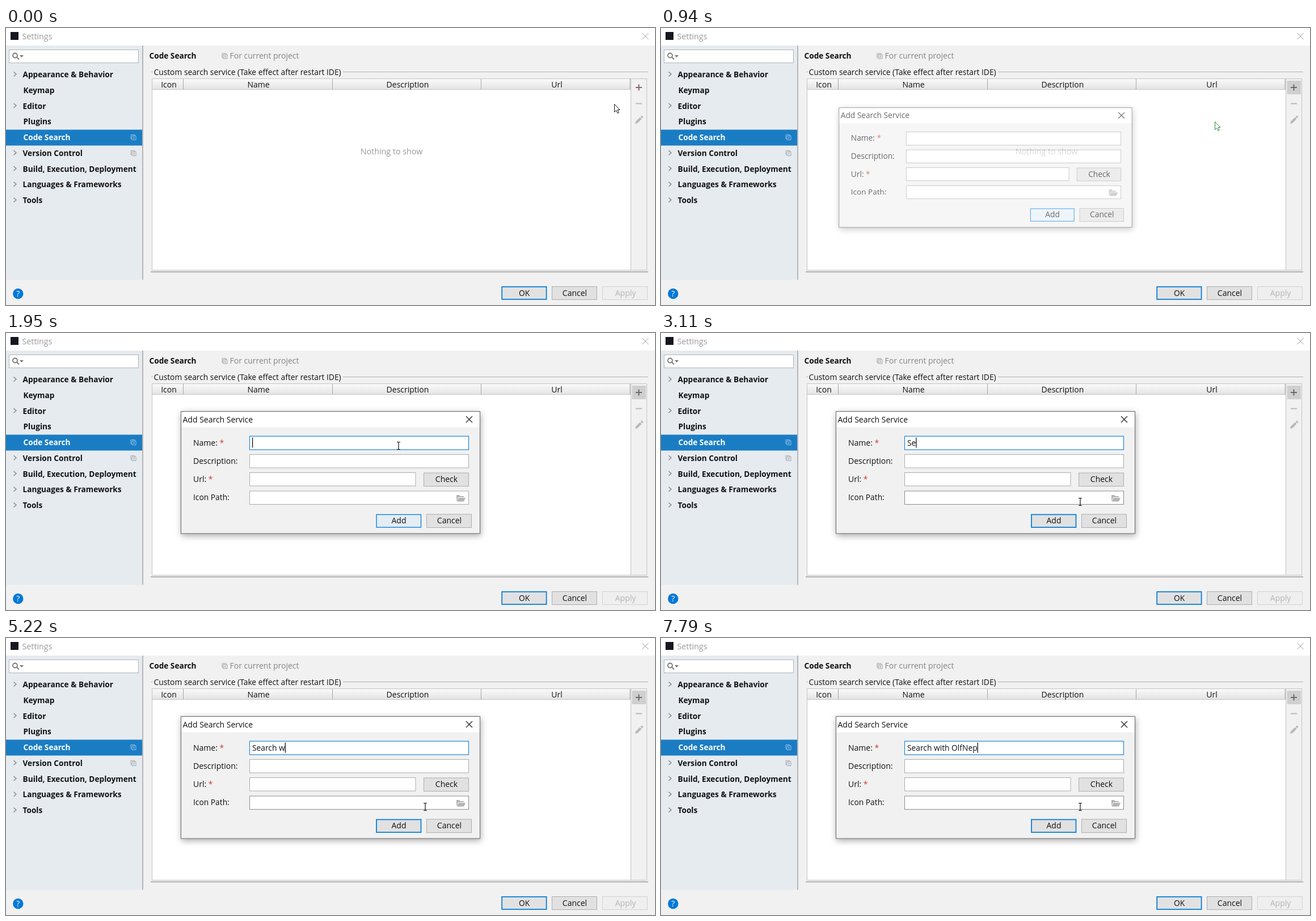
Animation of 1144 by 489 pixels, one loop 8 s. Source, as an HTML page:

```html
<!DOCTYPE html>
<html lang="en">
<head>
<meta charset="utf-8">
<title>Settings</title>
<style>
html, body { margin: 0; width: 100%; height: 100%; overflow: hidden; background: #f1f1f1; }
svg { display: block; width: 1144px; height: 489px; }
text { font: 14px "Open Sans", "Noto Sans", sans-serif; fill: #111; white-space: pre; }
.bold { font-size: 13.65px; font-weight: 700; }
.fit { font-size: 13.8px; }
.mid { text-anchor: middle; }
.dim { fill: #999; font-size: 14.3px; }
.line { fill: none; stroke: #888; stroke-width: 1.5; }
.field { fill: #fff; stroke: #ababab; }
.btn { fill: #e1e1e1; stroke: #adadad; }
.primary { fill: #e1e1e1; stroke: #0a7fd9; stroke-width: 1.8; }
.star { fill: #c8403a; }
</style>
</head>
<body>
<svg viewBox="0 0 1144 489">
  <defs>
    <linearGradient id="head" x2="0" y2="1">
      <stop offset="0" stop-color="#fafafa"/><stop offset="1" stop-color="#e4e4e4"/>
    </linearGradient>
    <filter id="blur" x="-10%" y="-10%" width="120%" height="125%"><feGaussianBlur stdDeviation="6"/></filter>
    <g id="copy" fill="none" stroke-width="1">
      <path d="M2.5 7.5H.5V.5H7.500V2.500"/>
      <path d="M2.5 2.5H9.5V9.5H2.5ZM4.500 5H7.500M4.500 7H7.500"/>
    </g>
  </defs>

  <!-- window -->
  <rect width="1144" height="489" fill="#f1f1f1"/>
  <rect width="1144" height="31" fill="#fff"/>
  <rect x="8" y="7" width="14" height="14" fill="#15161f"/>
  <text x="28.500" y="20" class="dim">Settings</text>
  <path d="M1121.500 9L1132.500 20M1132.500 9L1121.500 20" class="line" style="stroke:#999;stroke-width:1"/>

  <!-- sidebar -->
  <rect y="31" width="240" height="413.500" fill="#e6ebf0"/>
  <rect x="240" y="31" width="2" height="413.500" fill="#b4b6b8"/>
  <rect x="5.500" y="38.500" width="228" height="23" fill="#fff" stroke="#b2b5b8"/>
  <g class="line" style="stroke:#777;stroke-width:1.8">
    <circle cx="16" cy="48.500" r="4"/><path d="M19 51.500L23 55.500"/>
  </g>
  <path d="M24 48H31L27.500 52Z" fill="#777"/>
  <rect y="179.500" width="240" height="28" fill="#1a7dc4"/>
  <g id="tree"></g>
  <use href="#copy" x="219.500" y="188" stroke="#8fc0e6"/>
  <use href="#copy" x="219.500" y="216" stroke="#a4a8ac"/>
  <circle cx="21.300" cy="469" r="9.200" fill="#0078d7"/>
  <text x="21.300" y="474" class="mid" style="fill:#fff">?</text>

  <!-- page -->
  <text x="252.500" y="54" class="bold">Code Search</text>
  <use href="#copy" x="380.500" y="44.500" stroke="#a0a0a0"/>
  <text x="394.500" y="54" style="fill:#858585">For current project</text>
  <path d="M256 77.500H259M594 77.500H1132" stroke="#b0b0b0"/>
  <text x="260.500" y="83" class="fit">Custom search service (Take effect after restart IDE)</text>
  <path d="M255 430.500H1132" stroke="#9a9a9a" stroke-width="1.600"/>
  <rect x="257.500" y="89.500" width="872" height="338" fill="#f1f1f1" stroke="#c4c4c4"/>
  <rect x="258" y="90" width="843" height="337" fill="#fff"/>
  <rect x="258" y="90" width="843" height="18" fill="url(#head)"/>
  <path d="M258 108.500H1101M1101.500 90V427" stroke="#c4c4c4"/>
  <path d="M312.500 90V108M575.500 90V108M837.500 90V108M1100 90V108" stroke="#a6a6a6"/>
  <g class="fit">
    <text x="287" y="105" class="mid">Icon</text>
    <text x="445" y="105" class="mid">Name</text>
    <text x="708" y="105" class="mid">Description</text>
    <text x="971" y="105" class="mid">Url</text>
  </g>
  <text x="679.500" y="223" class="mid dim">Nothing to show</text>
  <rect id="hover" x="1103.500" y="93" width="24.500" height="24" fill="#cfcfcf"/>
  <path id="plus" d="M1110 105H1121M1115.500 99.500V110.500" stroke-width="2"/>
  <path d="M1110 133.500H1121" stroke="#b8b8b8" stroke-width="2"/>
  <path d="M1109 169L1110 165L1117.500 157.500L1120.500 160.500L1113 168ZM1118.500 156.500L1120 155Q1121 154.500 1122 155.500L1123 156.500Q1123.500 157.500 1122.500 158.500L1121.500 159.500Z" fill="#b8b8b8"/>
  <rect x="874.200" y="456.800" width="78.400" height="22.200" class="primary"/>
  <text x="913.500" y="472.500" class="mid fit">OK</text>
  <rect x="962.500" y="456.500" width="79" height="23" class="btn"/>
  <text x="1002.500" y="472.500" class="mid">Cancel</text>
  <rect x="1051.500" y="456.500" width="79" height="23" fill="#efefef" stroke="#d2d2d2"/>
  <text x="1092" y="472.500" class="mid" style="fill:#b4b4b4">Apply</text>

  <!-- dialog -->
  <g id="dialog">
    <rect x="309" y="141" width="528" height="217" fill="#000" opacity=".33" filter="url(#blur)"/>
    <rect x="308.500" y="138.500" width="527" height="215.500" fill="#f1f1f1"/>
    <rect x="308.500" y="138.500" width="527" height="28" fill="#fff"/>
    <rect x="308.500" y="138.500" width="527" height="215.500" fill="none" stroke="#666"/>
    <text x="311.500" y="157.500">Add Search Service</text>
    <path d="M811 147L822 158M822 147L811 158" stroke="#222" stroke-width="1.200"/>
    <text x="330" y="198.500">Name: <tspan class="star">*</tspan></text>
    <text x="330" y="231">Description:</text>
    <text x="330" y="263">Url: <tspan class="star">*</tspan></text>
    <text x="330" y="295" class="fit">Icon Path:</text>
    <rect id="name" x="429.500" y="182.200" width="386" height="23.800" class="field"/>
    <rect x="429.500" y="214.500" width="386" height="23.500" class="field"/>
    <rect x="429.500" y="246.500" width="292.500" height="23.500" class="field"/>
    <rect id="path" x="429.500" y="279" width="386" height="23.500" class="field"/>
    <path d="M794 297V286H799L801 288H807V290H797Z" fill="#b4b4b4"/>
    <path d="M797.500 291H810L807 297.500H794.500Z" fill="#b4b4b4"/>
    <rect x="736.500" y="247" width="79" height="23.500" class="btn"/>
    <text x="776.500" y="263" class="mid">Check</text>
    <rect id="add" x="653" y="320.500" width="78.500" height="22.500"/>
    <text x="692.500" y="336" class="mid">Add</text>
    <rect x="741.500" y="320" width="79" height="23.500" class="btn"/>
    <text x="781.500" y="336" class="mid">Cancel</text>
    <text id="typed" x="434" y="198.500" class="fit"></text>
    <rect id="caret" y="184.500" width="1.200" height="18" fill="#000"/>
  </g>

  <path id="arrow" d="M.5 .5V14.500L3.800 11.500L6 16.500L8.200 15.500L6 10.500H10Z" fill="#fff"/>
  <path id="beam" d="M-3 -6.500H-1Q0 -6.500 0 -5.500Q0 -6.500 1 -6.500H3M0 -5.500V5.500M-3 6.500H-1Q0 6.500 0 5.500Q0 6.500 1 6.500H3" fill="none" stroke="#111" stroke-width="1.200"/>
</svg>
<script>
const LOOP = 8000;
const $ = id => document.getElementById(id);
const show = (id, on) => $(id).setAttribute('visibility', on ? 'visible' : 'hidden');
const set = (id, attrs) => Object.entries(attrs).forEach(([k, v]) => $(id).setAttribute(k, v));

// A leading ">" marks a node that can be expanded.
const nodes = ['>Appearance & Behavior', 'Keymap', '>Editor', 'Plugins', 'Code Search',
  '>Version Control', '>Build, Execution, Deployment', '>Languages & Frameworks', '>Tools'];
$('tree').innerHTML = nodes.map((node, i) => {
  const y = 82 + i * 27.75, open = node[0] === '>';
  const label = node.replace('>', '').replace('&', '&amp;');
  return (open ? `<path class="line" d="M13.5 ${y - 4.5}L18 ${y - .5}L13.5 ${y + 3.5}"/>` : '') +
    `<text class="bold" x="${open ? 29.5 : 30.5}" y="${y + 5}"${i === 4 ? ' style="fill:#fff"' : ''}>${label}</text>`;
}).join('');

const phrase = 'Search with OlfNep';
const keys = [2810, 3110, 3340, 4200, 4530, 4670, 4850, 5220, 5450, 5600, 5770, 5920,
  6480, 6710, 6930, 7480, 7710, 7790];
const blinks = [[2270, 2730], [3880, 4200], [7390, 7480]];

// Pointer stops: time, x, y
const stops = [
  [0, 1072, 134], [70, 1075, 131], [150, 1083, 124], [230, 1093, 116], [310, 1102, 109],
  [400, 1108, 104], [480, 1111, 101], [560, 1112, 100],
  [790, 1092, 112], [870, 1040, 138], [940, 976, 165], [1030, 874, 188], [1110, 773, 203],
  [1190, 697, 208], [1270, 695, 211], [1320, 694, 212], [1490, 692, 202], [1570, 690, 195],
  [1880, 692, 199], [1960, 700, 217], [2040, 713, 244], [2110, 726, 272], [2190, 736, 292], [2270, 739, 298]
];
// Dialog opening: time, scale, opacity
const opening = [[0, 1, 0], [870, .945, .3], [940, .98, .62], [1030, .996, .9], [1110, 1, 1]];
const at = (list, t) => list.reduce((last, s) => s[0] <= t ? s : last);

function draw(t) {
  const [, x, y] = at(stops, t);
  const beam = t >= 1490;
  show('beam', beam);
  show('arrow', !beam);
  set(beam ? 'beam' : 'arrow', { transform: `translate(${x} ${y})` });
  set('arrow', { stroke: t >= 870 && t < 1030 ? '#2b8a3e' : '#16161e' });

  const hover = t >= 400;
  show('hover', hover);
  set('plus', { stroke: hover ? '#6a6a6a' : '#7d6b68' });

  const [, scale, opacity] = at(opening, t);
  set('dialog', { opacity, transform: `translate(572 246) scale(${scale}) translate(-572 -246)` });

  const focus = t >= 1800;
  set('name', {
    style: focus ? 'stroke:#1c88dc;stroke-width:1.2' : t >= 1490 ? 'stroke:#7a7a7a' : ''
  });
  set('path', { style: t >= 2190 ? 'stroke:#8c8c8c' : '' });

  const fade = Math.min(1, Math.max(0, Math.floor((t - 1800) / 80) / 4));
  const mix = (a, b) => Math.round(a + (b - a) * fade);
  set('add', {
    fill: `rgb(${mix(229, 225)},${mix(241, 225)},${mix(251, 225)})`,
    stroke: '#0a7fd9', 'stroke-width': 1.2 + .6 * fade
  });

  const text = phrase.slice(0, keys.filter(k => k <= t).length);
  if ($('typed').textContent !== text) $('typed').textContent = text;
  const end = text ? 434 + $('typed').getComputedTextLength() : 434;
  set('caret', { x: end });
  show('caret', focus && !blinks.some(([a, b]) => t >= a && t < b));
}

const start = performance.now();
function tick() {
  draw((performance.now() - start) % LOOP);
  requestAnimationFrame(tick);
}
tick();
</script>
</body>
</html>
```
